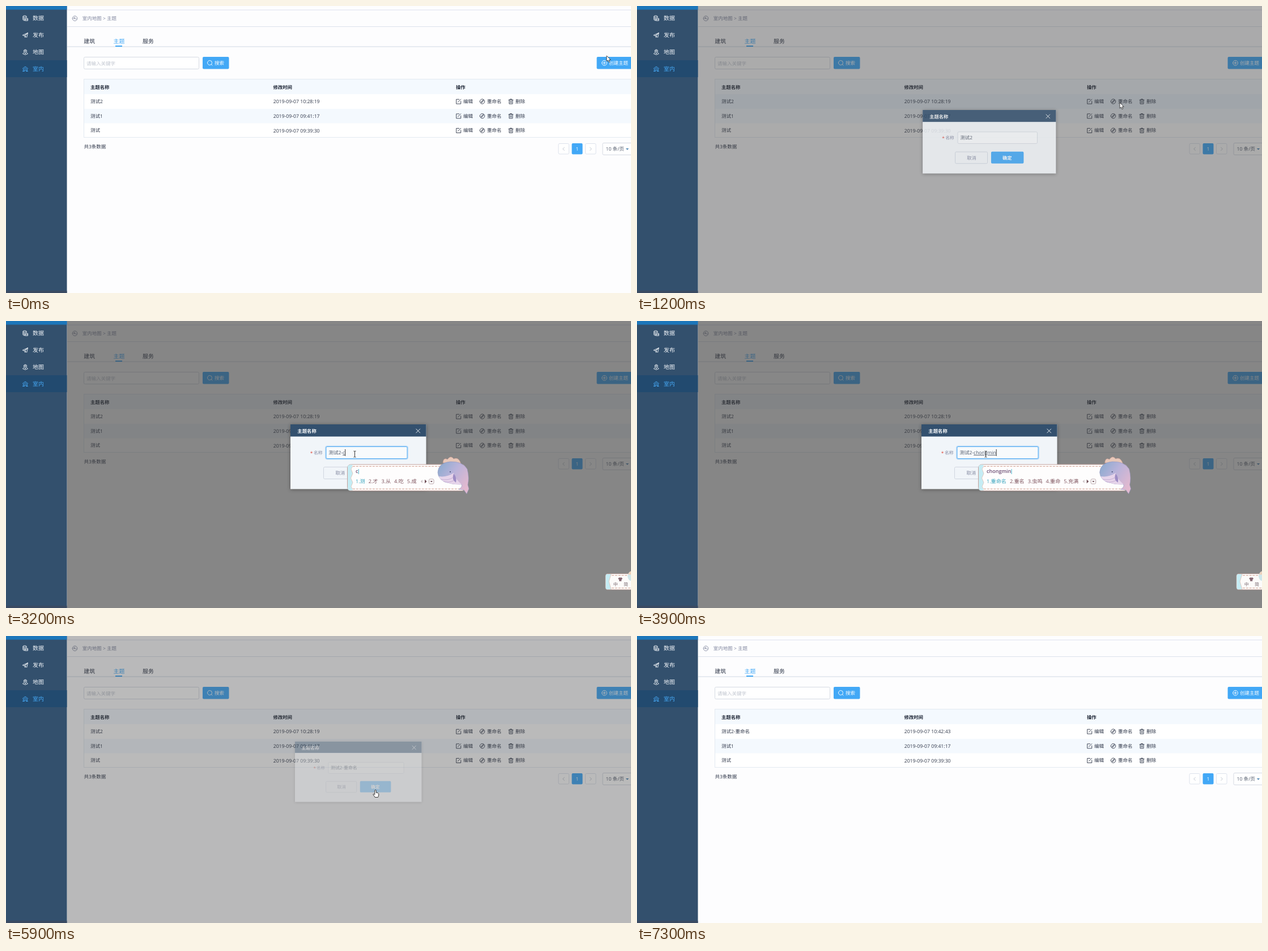
An HTML page that plays this animation: 1103x508 px, repeating every 8 s.

```html
<!DOCTYPE html>
<html lang="zh-CN">
<head>
<meta charset="utf-8">
<title>主题重命名</title>
<style>
  html, body { margin: 0; width: 100%; height: 100%; overflow: hidden; background: #fdfdfe; }
  svg { display: block; width: 100%; height: 100%; }
  text { font-family: "Open Sans", "Noto Sans CJK SC", "Noto Sans CJK", sans-serif; text-rendering: geometricPrecision; white-space: pre; }
  .icon { fill: none; stroke: currentColor; stroke-width: .9; stroke-linejoin: round; stroke-linecap: round; }
</style>
</head>
<body>
<svg id="stage" viewBox="0 0 1103 508" xmlns="http://www.w3.org/2000/svg"></svg>
<script>
const BLUE = '#42a8f6', INK = '#30384a', MUTED = '#8288a0', LINE = '#dde2ec', TINT = '#f4f9fe';
const LOOP = 8000, STEP = 100;

const rect = (x, y, w, h, fill, more = '') => `<rect x="${x}" y="${y}" width="${w}" height="${h}" fill="${fill}" ${more}/>`;
const box = (x, y, w, h, stroke, fill = '#fff', more = '') => rect(x, y, w, h, fill, `rx="2" stroke="${stroke}" ${more}`);
const path = (d, fill, more = '') => `<path d="${d}" fill="${fill}" ${more}/>`;
// Text is placed by its left edge and its vertical centre.
const text = (x, cy, s, size = 8.5, fill = INK, more = '') =>
  `<text x="${x}" y="${cy + size * .37}" font-size="${size}" fill="${fill}" ${more}>${s}</text>`;
const icon = (x, y, d, color) => `<path class="icon" transform="translate(${x} ${y})" style="color:${color}" d="${d}"/>`;
const ring = r => `M${-r} 0a${r} ${r} 0 1 0 ${2 * r} 0a${r} ${r} 0 1 0 ${-2 * r} 0`;
const BOLD = 'font-weight="700"', MEDIUM = 'font-weight="500"';

const ICONS = {
  data: 'M-4 -3a3 1.4 0 1 0 6 0a3 1.4 0 1 0 -6 0V3Q-3 4.4 -1 4.3M2 -3V-.5M-4 -.7Q-3 .6 -1 .6M-4 1.5Q-3 2.6 -1 2.6M0 .5H4.5V4.5H0ZM0 2.5H4.5',
  publish: 'M-4.5 0L4.5 -4L2.8 4L-.5 1.8ZM-2 1L4.5 -4L-.5 1.8V4.3L1 2.8',
  map: 'M0 2.6Q-3 -.5 -2.6 -2.4A2.7 2.7 0 0 1 2.6 -2.4Q3 -.5 0 2.6ZM-1 -1.8a1 1 0 1 0 2 0a1 1 0 1 0 -2 0M-2.6 1L-4.5 3L0 4.8L4.5 3L2.6 1',
  indoor: 'M-4.7 -.6L0 -4.2L4.7 -.6M-3.4 .8L0 -1.8L3.4 .8M-3.4 .8V4.2M3.4 .8V4.2M-1.5 4.2V1.7H1.5V4.2M-4.5 4.2H-1.5M1.5 4.2H4.5',
  back: ring(4.3) + 'M-.4 -2.2L-2.3 -.5L-.4 1.1M-2.2 -.5H1Q2.4 -.4 2.2 1.6',
  search: ring(4) + 'M2.9 2.9L4.6 4.6',
  plus: ring(4.4) + 'M-2.4 0H2.4M0 -2.4V2.4',
  edit: 'M1 -3.8H-4V4.2H4V-.5M-1.2 1.2L4 -4',
  rename: ring(4.2) + 'M2.2 -2.2L.7 .8L-2.2 2.2L-.8 -.7Z',
  trash: 'M-4 -2.7H4M-1.5 -2.7V-4.2H1.5V-2.7M-3 -2.7V4.2H3V-2.7M-1 -.7V2.3M1 -.7V2.3',
};

const menuItem = (y, label, name, active) => {
  const color = active ? '#47a9f5' : '#f2f5f9';
  return (active ? rect(0, 96, 107.5, 30, '#224a6f') : '') + icon(34, y, ICONS[name], color) + text(47, y, label, 10, color);
};

const tableRow = (y, name, time, id = '') =>
  text(149, y, name, 8.5, INK, id && `id="${id}Name"`) + text(471.7, y, time, 8.68, INK, id && `id="${id}Time"`) +
  icon(798.7, y, ICONS.edit, INK) + text(807, y, '编辑') +
  icon(840.5, y, ICONS.rename, INK) + text(849, y, '重命名') +
  icon(891, y, ICONS.trash, INK) + text(899, y, '删除');

const page =
  rect(0, 0, 1103, 508, '#fdfdfe') +
  rect(108, 6.5, 995, 1, '#dde0ee') + rect(108, 36, 995, 1, LINE) + rect(108, 71.5, 995, 1, '#cfdae6') +
  icon(121.5, 22, ICONS.back, MUTED) + text(134.7, 21.7, '室内地图 &gt; 主题', 8.5, MUTED) +
  text(137.3, 62, '建筑', 9.9) + text(189.5, 62, '主题', 9.9, BLUE) + text(241, 62, '服务', 9.9) + rect(193, 70, 12, 2, BLUE) +
  box(137.5, 90.5, 203, 21, '#d5dae3') + text(142, 101.5, '请输入关键字', 8.5, '#bfc4ce') +
  rect(347, 90, 46.5, 21.5, BLUE, 'rx="2"') + icon(359.5, 100.5, ICONS.search, '#fff') + text(368, 101, '搜索', 8.5, '#fff', MEDIUM) +
  rect(1042.5, 90, 70, 21.5, BLUE, 'rx="2"') + icon(1056, 100.8, ICONS.plus, '#fff') + text(1064, 101, '创建主题', 8.5, '#fff', MEDIUM) +
  rect(137.5, 129.5, 975, 103, '#fff', 'stroke="#e3eaf1"') + rect(138, 130, 965, 26, TINT) + rect(138, 182, 965, 25.5, TINT) +
  rect(138, 156, 965, 26, '#ebf4fc', 'id="hoverRow"') +
  text(149, 144, '主题名称', 8.4, '#1c2434', BOLD) + text(471.5, 144, '修改时间', 8.4, '#1c2434', BOLD) + text(794, 144, '操作', 8.4, '#1c2434', BOLD) +
  tableRow(169, '测试2', '2019-09-07 10:28:19', 'first') + tableRow(194.7, '测试1', '2019-09-07 09:41:17') + tableRow(220.3, '测试', '2019-09-07 09:39:30') +
  text(137.5, 248.7, '共3条数据') +
  box(975, 243.5, 18.5, 18.5, LINE) + box(1022.5, 243.5, 18.5, 18.5, LINE) + rect(998.5, 243, 19, 19.5, BLUE, 'rx="2"') +
  icon(984, 253, 'M1.4 -2.6L-1.4 0L1.4 2.6', '#bcc2cc') + icon(1032, 253, 'M-1.4 -2.6L1.4 0L-1.4 2.6', '#bcc2cc') +
  text(1005.5, 253, '1', 8.5, '#fff') +
  box(1053, 242.5, 70, 21, '#d5dae3') + text(1058.5, 253, '10 条/页', 8.6, '#555d6e') + path('M1093.8 252h5.4l-2.7 2.8z', '#4d86b4');

const sidebar =
  rect(0, 0, 107.5, 508, '#33506d') + rect(0, 0, 107.5, 6.5, '#1c76ba') + rect(0, 504, 107.5, 4, '#3a4a62') +
  menuItem(21.5, '数据', 'data') + menuItem(51.5, '发布', 'publish') + menuItem(81.5, '地图', 'map') + menuItem(111.3, '室内', 'indoor', true);

const dialog =
  rect(502, 183, 239.5, 114.5, '#f1f5f9', 'style="filter:drop-shadow(0 1px 3px rgba(0,0,0,.35))"') +
  rect(502, 183, 239.5, 21.5, '#33506e') + text(514.3, 194.8, '主题名称', 8.4, '#fff', BOLD) +
  icon(727.2, 194.5, 'M-3.4 -3.4L3.4 3.4M3.4 -3.4L-3.4 3.4', '#fff') +
  text(536.8, 234, '*', 8.5, '#e0493c') + text(543, 232.8, '名称', 7.8, MUTED) +
  rect(564, 221.5, 145, 23, 'none', 'id="glow" rx="3" stroke="#a9d4f7" stroke-width="1.5"') +
  box(565, 222.5, 143, 21, '#d5dbe4', '#f7fafc', 'id="field"') +
  text(569.5, 233, '', 8.5, '#4b5466', 'id="value"') + rect(0, 227, 1, 12, '#333', 'id="caret"') +
  box(560.5, 258.5, 58, 21, '#d0d6e0', '#f1f5f9') + text(581.5, 269, '取消', 8.4, MUTED) +
  rect(625, 258, 58.5, 21.5, BLUE, 'id="confirm" rx="2"') + text(645.5, 269, '确定', 8.4, '#fff', BOLD);

const SKIN = { edge: '#c3a19b', dash: '#cf9c8b', sea: '#c5ecf4', ink: '#7d525c' };
const dashes = (x1, x2, y) => `<path d="M${x1} ${y}H${x2}" stroke="${SKIN.dash}" stroke-dasharray="4 1.8"/>`;

const imeBar =
  rect(1058, 447.5, 60, 28, '#fcfbfa', `rx="4" stroke="${SKIN.edge}" stroke-width=".8"`) +
  path('M1061 448H1068L1064 461L1068 475H1061Q1058.5 475 1058.5 472V451Q1058.5 448 1061 448Z', SKIN.sea) +
  path('M1068 448L1064 461L1068 475', 'none', 'stroke="#dfb9ac" stroke-width=".7"') +
  dashes(1069, 1103, 450.3) + dashes(1069, 1103, 472.7) +
  path('M1080.2 455.5L1082.6 453.7Q1084 455 1085.6 453.7L1088 455.5L1086.8 457.7L1086.2 457.3V460.6H1082V457.3L1081.4 457.7Z', '#876a74') +
  text(1071.8, 466, '中', 8, '#7b6c74') + text(1090, 466, '简', 8, '#7b6c74') +
  path('M1097 452Q1098 444 1103 443V460Q1098 459 1097 452Z', '#cfe6ea') + path('M1098 449Q1100 443 1103 443V449Z', '#ecd2bd');

const whale =
  path('M771 251Q772 241 779 245Q785 237 790 244Q799 240 803 253Z', '#e8c8b9', 'stroke="#c9988f" stroke-width=".6"') +
  path('M762 268Q763 251 784 249Q805 248 814 262Q818 277 815 290L817 297L813 306L808 299L799 298Q806 294 804 289Q789 290 775 285Q763 280 762 268Z', 'url(#whaleSkin)', 'stroke="#8f92bd" stroke-width=".6"') +
  path('M764 275Q778 277 790 269Q793 280 804 289Q788 290 775 285Q766 281 764 275Z', '#e6d4ea') +
  path('M790 270Q796 277 794 286Q786 281 790 270Z', '#9d8cc4') +
  path('M767 280Q780 283 789 277M772 284Q782 287 791 282', 'none', 'stroke="#b79cc9" stroke-width=".7"') +
  '<circle cx="784" cy="267" r="1" fill="#3c4770"/>';

const CANDIDATES = {
  1: '测 才 从 吃 成', 2: '吃 成 出 车 长', 3: '冲 抽 丑 愁 仇', 4: '冲 重 虫 充 宠', 5: '冲 重 虫 充 宠',
  6: '重命名 重名 虫鸣 重命 充满', 10: '重命名 重名 虫鸣 重命 冲',
};
const candidatesFor = n => CANDIDATES[n] || CANDIDATES[n > 10 ? 10 : 6];

function imePopup(pinyin) {
  let x = 617, items = '';
  candidatesFor(pinyin.length).split(' ').forEach((word, i) => {
    items += text(x, 284, `${i + 1}.${word}`, 9.1, i ? SKIN.ink : '#35a3bd');
    x += 22.7 + 9.1 * (word.length - 1);
  });
  const extra = x - 730.5;
  return rect(602.5, 254, 208 + extra, 46.5, '#fefdfd', `rx="6" stroke="${SKIN.edge}"`) +
    path('M607 254.5H612L609 262L612 270L608.5 278L612 286L609 293L612 300H607Q603 300 603 295V259Q603 254.5 607 254.5Z', SKIN.sea) +
    path('M612 257L609 262L612 270L608.5 278L612 286L609 293L612 298', 'none', 'stroke="#dfb9ac" stroke-width=".7"') +
    dashes(612, 805 + extra, 257.3) + dashes(612, 805 + extra, 297.3) +
    text(617, 266, pinyin, 9, '#6a4b72', 'id="pinyin" font-weight="600"') + rect(0, 262, 1, 9, '#49b6cf', 'id="pinyinCaret"') +
    items + `<g transform="translate(${extra})">` +
    path('M735 281v6l-3.2 -3z', '#cfc6c9') + path('M739 280.5v7l3.6 -3.5z', '#6f5058') +
    box(746.5, 279.8, 8.5, 8.5, '#b9a6aa') + path('M748.6 283h4.4l-2.2 2.4z', '#6f5058') + whale + '</g>';
}

const POINTERS = {
  arrow: path('M0 0V10L2.3 8L4 11.6L5.7 10.9L4.1 7.3H7.2Z', '#fff', 'stroke="#222" stroke-width=".8"'),
  beam: path('M-2 -5.2H-.5L0 -4.7L.5 -5.2H2M0 -4.7V5M-2 5.5H-.5L0 5L.5 5.5H2', 'none', 'stroke="#222" stroke-width=".9"'),
  hand: path('M-1.2 1.2Q0 -.8 1.2 1.2V5.2Q5 5.2 5.7 7.2V10Q5.3 12 4.4 13.5H-.8Q-2 11 -4 9Q-4.2 7.2 -2.6 7.6L-1.2 9Z', '#fff', 'stroke="#222" stroke-width=".9"'),
};

document.getElementById('stage').innerHTML =
  `<defs><linearGradient id="whaleSkin" x2="1" y2=".7"><stop stop-color="#86a9cd"/><stop offset=".5" stop-color="#b9b3da"/><stop offset="1" stop-color="#e3b9cf"/></linearGradient></defs>` +
  page + rect(107.5, 0, 995.5, 508, '#373737', 'id="mask"') + sidebar +
  `<g id="dialog">${dialog}</g><g id="imeBar">${imeBar}</g><g id="popup"></g>` +
  Object.entries(POINTERS).map(([kind, shape]) => `<g id="${kind}">${shape}</g>`).join('');

const $ = id => document.getElementById(id);
const show = (id, on) => $(id).setAttribute('visibility', on ? 'visible' : 'hidden');
const within = (t, ...spans) => spans.some(([from, to]) => t >= from && t < to);

// Linear interpolation over keys of the form [time, ...values].
function track(keys, t) {
  const next = keys.findIndex(key => key[0] > t);
  if (next < 0) return keys[keys.length - 1].slice(1);
  if (next === 0) return keys[0].slice(1);
  const a = keys[next - 1], b = keys[next], p = (t - a[0]) / (b[0] - a[0]);
  return a.slice(1).map((v, i) => v + (b[i + 1] - v) * p);
}

const POINTER_PATH = [
  [0, 1060, 88], [300, 880, 150], [500, 798, 174], [700, 852, 171], [1200, 852, 171], [1700, 615.5, 235.5], [5200, 615.5, 235.5],
  [5400, 654, 278], [5500, 654, 278], [5600, 652, 272], [6600, 652, 272], [6700, 690, 291], [6900, 937, 322], [7100, 1088, 190], [7200, 1062, 78],
];
// Mask strength and dialog strength.
const FADE = [
  [1000, 0, 0], [1100, .27, .43], [1200, .7, .82], [1300, 1, 1], [5700, 1, 1],
  [5800, .88, .82], [5900, .57, .33], [6000, .2, .04], [6100, 0, 0],
];
const PINYIN = 'chongmingmi';

function lettersTyped(t) {
  if (!within(t, [3200, 4600])) return 0;
  const n = t < 4200 ? Math.min(8, (t - 3200) / STEP + 1) : (t - 4200) / STEP + 9;
  return Math.min(PINYIN.length, n);
}

let shownPinyin = '';
function draw(t) {
  const [mask, strength] = track(FADE, t);
  $('mask').setAttribute('opacity', mask * .6);
  $('dialog').setAttribute('opacity', strength);
  $('dialog').setAttribute('transform', `translate(621.7 240.2) scale(${.9 + .1 * strength}) translate(-621.7 -240.2)`);

  const renamed = t >= 6200;
  $('firstName').textContent = renamed ? '测试2-重命名' : '测试2';
  $('firstTime').textContent = renamed ? '2019-09-07 10:42:43' : '2019-09-07 10:28:19';
  show('hoverRow', within(t, [1100, 1300]));

  const pinyin = PINYIN.slice(0, lettersTyped(t));
  const typed = '测试2' + (t >= 2500 ? '-' : '') + (t >= 4600 ? '重命名' : '');
  $('value').innerHTML = typed + (pinyin && `<tspan text-decoration="underline">${pinyin}</tspan>`);
  $('caret').setAttribute('x', 569.5 + $('value').getComputedTextLength());
  show('caret', within(t, [1800, 2300], [2500, 2900], [3200, 5100], [5600, 5800]));

  const focused = within(t, [1800, 5800]);
  show('glow', focused);
  $('field').setAttribute('stroke', focused ? '#5aaef3' : '#d5dbe4');
  $('confirm').setAttribute('fill', within(t, [5400, 6200]) ? '#55b1f7' : BLUE);
  show('imeBar', focused);

  if (pinyin !== shownPinyin) {
    $('popup').innerHTML = pinyin && imePopup(pinyin);
    if (pinyin) $('pinyinCaret').setAttribute('x', 617.3 + $('pinyin').getComputedTextLength());
    shownPinyin = pinyin;
  }

  const [x, y] = track(POINTER_PATH, t);
  const kind = within(t, [1600, 5300]) ? 'beam' : within(t, [5300, 6400]) ? 'hand' : 'arrow';
  for (const name in POINTERS) show(name, name === kind && t < 7300);
  $(kind).setAttribute('transform', `translate(${x} ${y})`);
}

const start = performance.now();
function tick() {
  const t = (performance.now() - start) % LOOP;
  draw(Math.floor(t / STEP) * STEP);
  requestAnimationFrame(tick);
}
tick();
</script>
</body>
</html>
```
